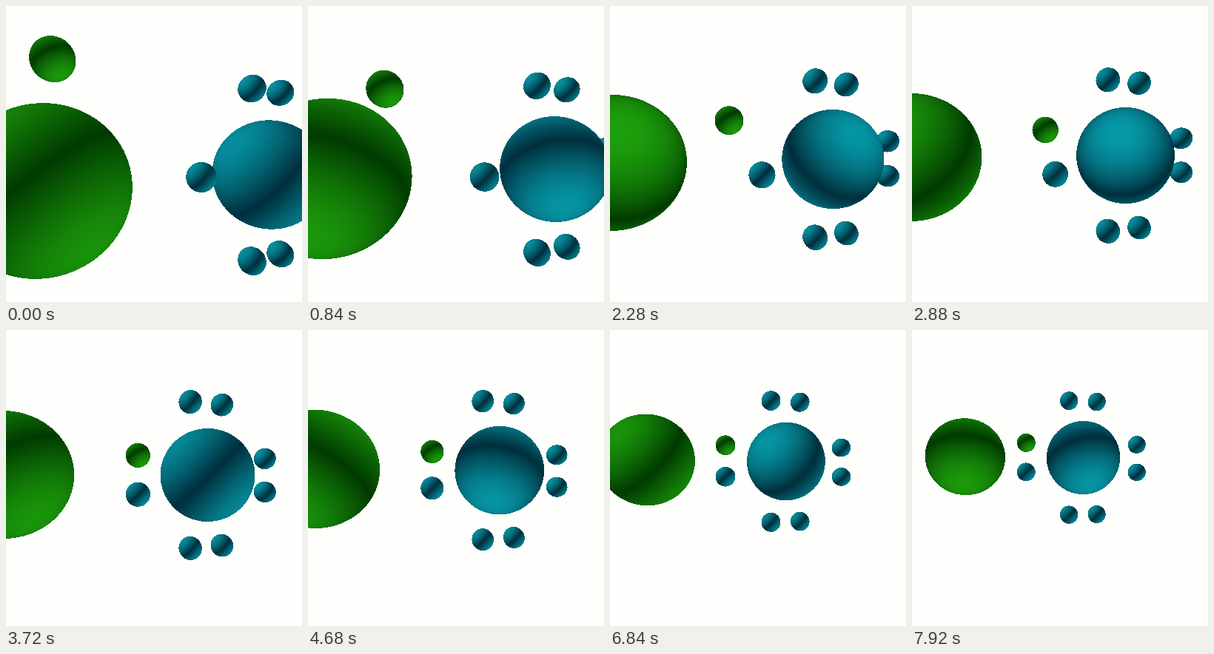
Write an HTML page with a canvas that moves like this. It is 400x400 px and loops after 8 s.

```html
<!DOCTYPE html>
<html lang="en">
<head>
<meta charset="utf-8">
<style>
  html, body { margin: 0; width: 100%; height: 100%; overflow: hidden; background: #fefefc; }
  canvas { display: block; }
</style>
</head>
<body>
<canvas id="stage" width="400" height="400"></canvas>
<script>
const SIZE = 400, MID = 200, FOCAL = 420;
const LOOP = 8000, STEP = 120, DOCK = 3160;
const RING = 1.555, GAP = 0.39, ELECTRON = 0.245;
const rad = degrees => degrees * Math.PI / 180;
const PITCH = rad(11);

const ctx = document.getElementById('stage').getContext('2d');
const image = ctx.createImageData(SIZE, SIZE);
const pixels = new Uint32Array(image.data.buffer);

// Dark and light ends of each material
const BLUE = [[0, 46, 60], [6, 158, 173]];
const GREEN = [[0, 58, 0], [30, 163, 12]];

// Apparent centre and radius of the two nuclei as the camera retreats
const times = [0, 840, 1800, 2880, 3720, 5760, 7920];
const blueTrack = {
  x: [357, 334, 312, 288.5, 272.5, 246, 231.5],
  y: [228, 220.5, 211.3, 202, 196, 183, 172.5],
  r: [73.5, 71.3, 68.7, 65, 63, 56, 49.5]
};
const greenTrack = {
  x: [45, 23, 7, -1.5, -4, 28, 71.8],
  y: [250, 233.5, 218.5, 204.5, 195.5, 180.5, 171.2],
  r: [118, 108.3, 97.3, 86.5, 86.5, 71.3, 51.8]
};

// Smooth curve through the values at the given times
function sample(values, t) {
  const last = times.length - 1;
  let i = 0;
  while (i < last - 1 && t >= times[i + 1]) i++;
  const slope = k => {
    const a = Math.max(0, k - 1), b = Math.min(last, k + 1);
    return (values[b] - values[a]) / (times[b] - times[a]);
  };
  const span = times[i + 1] - times[i], s = (t - times[i]) / span;
  const s2 = s * s, s3 = s2 * s;
  return values[i] * (2 * s3 - 3 * s2 + 1) + values[i + 1] * (3 * s2 - 2 * s3)
    + span * (slope(i) * (s3 - 2 * s2 + s) + slope(i + 1) * (s3 - s2));
}

const place = (track, t) => ({
  x: sample(track.x, t), y: sample(track.y, t), r: sample(track.r, t)
});

// Sphere with a dark equator and light poles, stretched away from the view centre
function drawSphere({ x, y, r }, [dark, light], spin) {
  const offX = x - MID, offY = y - MID, dist = Math.hypot(offX, offY) || 1;
  const ex = offX / dist, ey = offY / dist;
  const stretch = Math.hypot(1, dist / FOCAL), reach = r * stretch;
  const turn = spin + Math.atan2(-offX, FOCAL);
  const up = Math.SQRT1_2, front = Math.sin(turn) * up;
  const nx = Math.cos(turn) * up;
  const ny = up * Math.cos(PITCH) + front * Math.sin(PITCH);
  const nz = front * Math.cos(PITCH) - up * Math.sin(PITCH);
  const from = v => Math.max(0, Math.floor(v - reach));
  const to = v => Math.min(SIZE - 1, Math.ceil(v + reach));

  for (let py = from(y); py <= to(y); py++) {
    for (let px = from(x); px <= to(x); px++) {
      const dx = px + 0.5 - x, dy = py + 0.5 - y;
      const squeeze = (dx * ex + dy * ey) * (1 / stretch - 1);
      const sx = (dx + ex * squeeze) / r, sy = (dy + ey * squeeze) / r;
      const depth = 1 - sx * sx - sy * sy;
      if (depth < 0) continue;
      const sz = Math.sqrt(depth);
      const shade = Math.abs(sx * nx + sy * ny + sz * nz) * (0.75 + 0.25 * sz);
      const [red, green, blue] = dark.map((c, i) => Math.round(c + (light[i] - c) * shade));
      pixels[py * SIZE + px] = 0xff000000 | blue << 16 | green << 8 | red;
    }
  }
}

function render(t) {
  pixels.fill(0xfffcfefe);
  const nucleus = place(blueTrack, t);

  // Undo the perspective swelling of the outline to get the true centre and radius
  const q = nucleus.r / Math.hypot(FOCAL, nucleus.r), radius = q * FOCAL;
  const centreX = (nucleus.x - MID) * (1 - q * q);
  const centreY = (nucleus.y - MID) * (1 - q * q);
  const yaw = rad(30.5 - 2.75 * t / 1000), c = Math.cos(yaw), s = Math.sin(yaw);
  const spin = rad(8 + 99.5 * t / 1000);
  const dock = Math.min(1, t / DOCK);

  // Projects a point given in nucleus radii within the turned ring
  const electron = (u, v, w, colour, tilt) => {
    const scale = 1 / (1 + q * (u * s + w * c));
    drawSphere({
      x: MID + (centreX + radius * (u * c - w * s)) * scale,
      y: MID + (centreY + radius * v) * scale,
      r: ELECTRON * radius * scale
    }, colour, rad(tilt));
  };

  for (const side of [-1, 1]) {
    electron(RING, side * GAP, 0, BLUE, 4);
    for (const end of [-1, 1]) electron(side * GAP, end * RING, 0, BLUE, 4);
  }
  drawSphere(nucleus, BLUE, spin);
  electron(-RING, GAP * dock, 0, BLUE, 4);
  drawSphere(place(greenTrack, t), GREEN, spin);

  const away = 1 - dock;
  electron(-RING - 2.43 * away, -GAP - 1.03 * away, -0.42 * away, GREEN, 40);
  ctx.putImageData(image, 0, 0);
}

function tick() {
  const t = performance.now() % LOOP;
  render(Math.floor(t / STEP) * STEP);
  requestAnimationFrame(tick);
}
tick();
</script>
</body>
</html>
```
